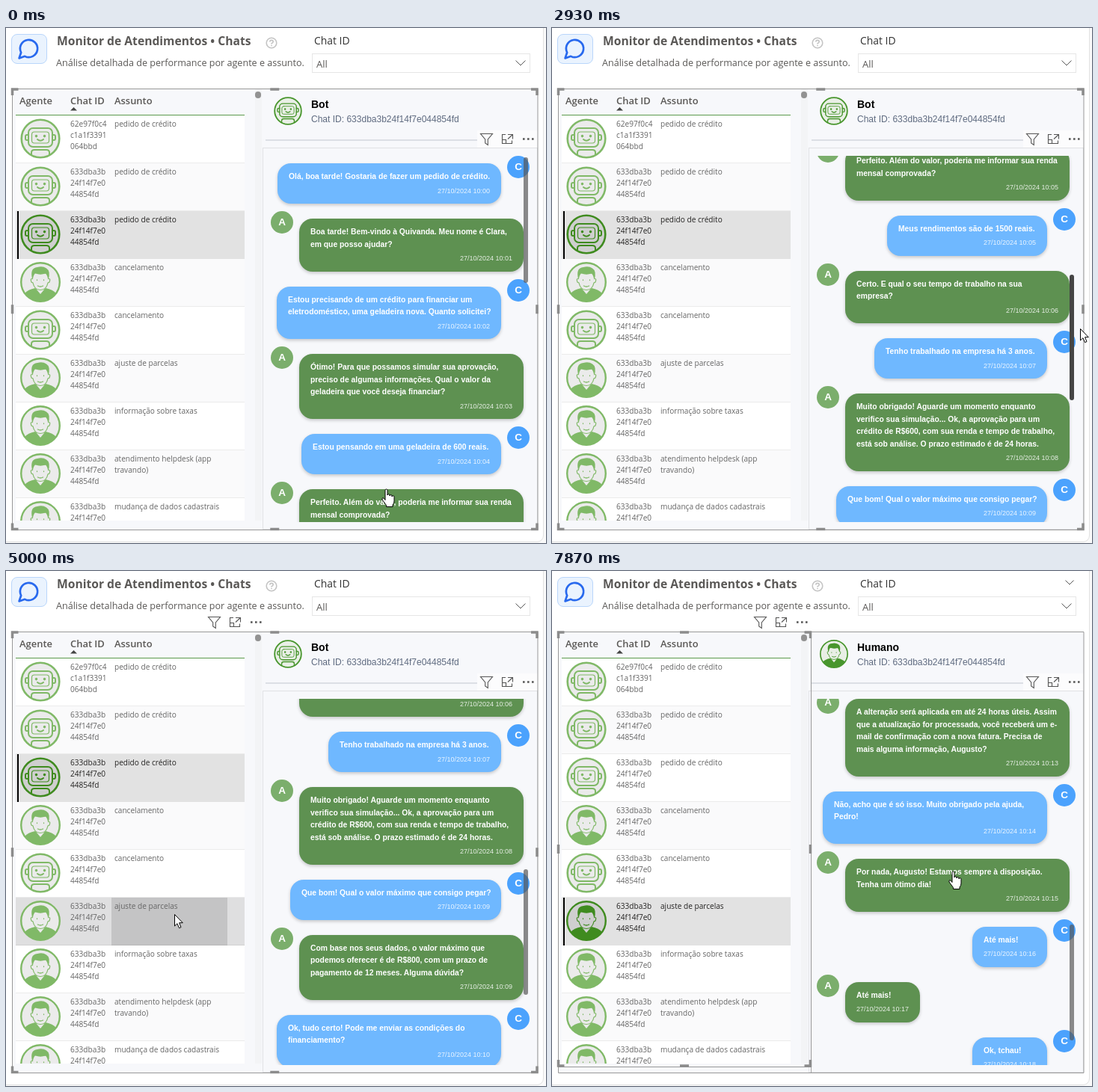
An HTML page that plays this animation: 722x689 px, repeating every 8 s.

```html
<!DOCTYPE html>
<html lang="pt-BR">
<head>
<meta charset="utf-8">
<title>Monitor de Atendimentos</title>
<style>
html, body { margin: 0; width: 100%; height: 100%; overflow: hidden; background: #fafafa; }
body { position: relative; font-family: "Open Sans", "Noto Sans", sans-serif; color: #5a5856; }
div, span, svg, b { position: absolute; box-sizing: border-box; white-space: nowrap; }
svg { overflow: visible; }
.card { left: -10px; top: -10px; width: 729px; height: 698px; background: #fff; border: 1px solid #e1e1e1; border-radius: 9px; }
.logo { left: 7px; top: 8px; width: 48px; height: 40px; background: #eaf3fe; border: 1px solid #b9d6fb; border-radius: 8px; }
.panel { left: 9px; top: 82px; width: 702px; height: 589px; background: #f7f8fb; }
.title { font: 700 15.65px/24px "Open Sans", sans-serif; }
.sub { font-size: 12.57px; line-height: 20px; }
.label { font-size: 13.9px; line-height: 20px; color: #333; }
.select { left: 409px; top: 34px; width: 292px; height: 26px; background: #fff; border: 1px solid #e6e6e6; font-size: 13px; line-height: 26px; padding-left: 5px; }
.head { top: 87px; font: 600 12.95px/20px "Open Sans", sans-serif; }
.gutter { left: 333px; top: 82px; width: 9px; height: 577px; background: #f3f4f6; }
.dot { left: 333px; top: 85px; width: 8px; height: 9px; border-radius: 4px; background: #929292; }
.table { left: 13px; top: 116px; width: 306px; height: 543px; overflow: hidden; border-top: 1px solid #5b9a4b; }
.row { left: 0; width: 306px; height: 64px; box-shadow: inset 0 -1px #ebebeb; background: #fff; color: #666; --bg: #ebebeb; font-size: 10.1px; line-height: 15px; }
.row:nth-child(even) { background: #fafafb; }
.row svg { left: 6px; top: 4px; color: #80b967; }
.row span { top: 4px; white-space: pre; }
.row i { position: absolute; inset: 0; }
.row.hover i { background: rgba(0,0,0,.11); }
.row.hover i::after { content: ""; position: absolute; left: 128px; width: 155px; height: 64px; background: rgba(0,0,0,.12); }
.row.on { background: #e2e2e2; box-shadow: none; color: #252423; --bg: #cfcfcf; }
.row.on::before { content: ""; position: absolute; left: 2px; width: 2px; height: 64px; background: #000; z-index: 1; }
.row.on svg { color: #3f8b1f; }
.agent { left: 358px; top: 92px; color: #48962d; --bg: #e9efe6; }
.name { left: 408px; top: 92px; font: bold 14px/20px Arial, "Liberation Sans", sans-serif; color: #000; }
.chatid { left: 408px; top: 112px; font: 12.03px/20px Arial, "Liberation Sans", sans-serif; color: #5f6b80; }
.rule { left: 347px; top: 149px; width: 363px; height: 2px; background: #dcdfe5; }
.edge { left: 343px; top: 160px; width: 368px; height: 511px; border: 1px solid #e0e1e4; }
.split { left: 346px; top: 82px; width: 1px; height: 589px; background: #a5a5a5; }
.tools { width: 81px; height: 23px; color: #555; }
.view { left: 344px; top: 171px; width: 366px; height: 490px; overflow: hidden; font-family: Arial, "Liberation Sans", sans-serif; }
.list { left: 0; top: 0; width: 366px; }
.msg { position: relative; height: max-content; margin-bottom: 20px; width: 366px; display: flex; }
.msg p { flex: none; margin: 0 0 0 48px; box-sizing: border-box; padding: 10px 15px; border-radius: 18px; color: #fff; font: bold 10.33px/16.5px Arial, "Liberation Sans", sans-serif; box-shadow: 0 2px 4px rgba(0,0,0,.2); background: #5e9151; }
.msg small { display: block; margin-top: 3px; text-align: right; font: 9px/14.5px Arial, "Liberation Sans", sans-serif; color: rgba(255,255,255,.85); }
.msg b { left: 10px; top: -10px; width: 30px; height: 30px; border-radius: 50%; background: #7bae6c; color: #fff; font-size: 13.5px; line-height: 30px; text-align: center; }
.msg.C { justify-content: flex-end; }
.msg.C p { margin: 0 48px 0 0; background: #6fb8ff; }
.msg.C b { left: 326px; background: #4ba2fd; }
.thumb { left: 692px; width: 6px; border-radius: 3px; background: rgba(85,85,85,.68); }
.thumb.dark { background: #454545; }
.off { display: none; }
</style>
</head>
<body>
<svg width="0" height="0" fill="none" stroke="currentColor">
  <symbol id="bot" viewBox="-27 -27 54 54">
    <g fill="none" stroke="currentColor" stroke-width="2" stroke-linecap="round">
      <circle r="25.3" stroke-width="2.6" style="fill:var(--bg)"/>
      <rect x="-16" y="-14" width="32" height="25" rx="6"/>
      <rect x="-11.5" y="-9" width="23" height="15" rx="3.5" stroke-width="1.200"/>
      <path d="M-16-5h-2q-2 0-2 2v3q0 2 2 2h2M16-5h2q2 0 2 2v3q0 2-2 2h-2M-4 1q4 3.500 8 0"/>
      <path d="M-12 21.500v-3q0-3.500 4-3.500h16q4 0 4 3.500v3"/>
      <path d="M-5.500-3.500v.1M5.500-3.500v.1" stroke-width="3.600"/>
    </g>
  </symbol>
  <symbol id="human" viewBox="-27 -27 54 54">
    <circle r="25.8" stroke="currentColor" stroke-width="2.4" style="fill:var(--bg)"/>
    <path d="M-21 15Q-17 10-7 8L0 13 7 8Q17 10 21 15A26 26 0 0 1-21 15Z" fill="currentColor"/>
    <path d="M-5 6V10L0 16 5 10V6Z" style="fill:var(--bg)"/>
    <path d="M-10.500-5Q-14-5-12 0L-10 1Q-8 10.500 0 10.500Q8 10.500 10 1L12 0Q14-5 10.500-5V-12H-10.500Z" style="fill:var(--bg)" stroke="currentColor" stroke-width="1.200"/>
    <path d="M-10.500-3Q-15-19-4-20Q3-22 8-18.500Q14-15 10.500-3Q9.500-9 7-11.500Q-1-9-7-12Q-9.500-9-10.500-3Z" fill="currentColor"/>
    <path d="M-4.500-3v.6M4.500-3v.6M-3.500 5q3.500 2 7 0" fill="none" stroke="currentColor" stroke-width="1.300" stroke-linecap="round"/>
  </symbol>
  <symbol id="tools" viewBox="0 0 81 23">
    <g fill="none" stroke="currentColor" stroke-width="1.1">
      <path d="M4.500 4.500h16l-6.200 7.500v7.500l-3.600-2.500v-5z"/>
      <path d="M38 5.500h-4.500v12h13v-4M41 5.500h6.500v6M47.500 5.500l-6.500 6M33.500 12.500h5v5"/>
    </g>
    <path d="M61 11.500h2.600M67 11.500h2.600M73 11.500h2.600" stroke="currentColor" stroke-width="2.400"/>
  </symbol>
</svg>

<div class="card"></div>
<div class="logo"></div>
<svg style="left:15px;top:12px" width="31" height="31" viewBox="0 0 24 24" fill="none" stroke="#2869ee" stroke-width="2.100" stroke-linejoin="round"><path d="M7.900 20A9 9 0 1 0 4 16.100L2 22Z"/></svg>
<span class="title" style="left:68px;top:5px">Monitor de Atendimentos • Chats</span>
<span class="sub" style="left:67px;top:37px">Análise detalhada de performance por agente e assunto.</span>
<svg style="left:347px;top:12px" width="16" height="16" fill="none" stroke="#c4c4c4" stroke-width="1.600"><circle cx="8" cy="8" r="6.800"/><path d="M5.800 6.600q0-2.200 2.200-2.200t2.200 2q0 1.200-2.200 2.400v.8M8 10.800v1.500"/></svg>
<span class="label" style="left:412px;top:7px">Chat ID</span>
<div class="select">All</div>
<svg style="left:681px;top:43px" width="14" height="8" fill="none" stroke="#555"><path d="M.5 .5 7 7 13.500 .5"/></svg>
<svg id="caret" style="left:686px;top:12px" width="12" height="7" fill="none" stroke="#555"><path d="M.5 .5 6 6 11.500 .5"/></svg>

<div class="panel"></div>
<span class="head" style="left:18px">Agente</span>
<span class="head" style="left:86px">Chat ID</span>
<span class="head" style="left:145px">Assunto</span>
<svg style="left:86px;top:106px" width="9" height="5"><path d="M0 4.500 4.500 0 9 4.500Z" fill="#444"/></svg>
<div class="gutter"></div><div class="dot"></div>
<div class="table" id="table"></div>

<svg class="agent" width="38" height="38"><use id="face" href="#bot"/></svg>
<span class="name" id="name">Bot</span>
<span class="chatid">Chat ID: 633dba3b24f14f7e044854fd</span>
<div class="rule"></div>
<div class="edge" id="edge"></div>
<div class="split" id="split"></div>
<svg class="tools" id="chatTools" style="left:630px;top:137px;background:#fcfcfd"><use href="#tools"/></svg>
<svg class="tools" id="tableTools" style="left:266px;top:57px"><use href="#tools"/></svg>
<div class="view" id="view"></div>
<div class="thumb" id="thumb"></div>

<svg width="722" height="689" style="left:0;top:0" fill="none" stroke="#989898">
  <path d="M8.500 81.500H711V671.500H8.500Z"/>
  <g id="groupFrame"></g>
  <g id="tableFrame"></g>
</svg>
<svg id="cursor" width="1" height="1" style="left:0;top:0" fill="#fff" stroke="#000" stroke-linejoin="round">
  <path id="arrow" d="M.5 .5V16L4 12.700 6.500 18.700 9 17.600 6.600 11.700H11.300Z"/>
  <path id="hand" d="M-2 14.500V1.700Q-2 0-.5 0T1 1.700V8Q1 6.700 2.500 6.700T4 8.200V9Q4.200 7.500 5.600 7.500T7 9V10Q7.300 8.800 8.600 8.800T10 10.300V16Q10 19 8 21V23.500H-.5V21.500L-6 14Q-6.600 12-5 11.700-4 11.600-2 14.500Z"/>
</svg>

<script>
const $ = id => document.getElementById(id);

const subjects = ['pedido de crédito', 'pedido de crédito', 'pedido de crédito', 'cancelamento', 'cancelamento',
  'ajuste de parcelas', 'informação sobre taxas', 'atendimento helpdesk (app\ntravando)', 'mudança de dados cadastrais'];
const agents = 'bbbhbhhhh';
$('table').innerHTML = subjects.map((s, i) => `<div class="row" style="top:${i * 64}px"><i></i>
<svg width="54" height="54"><use href="#${agents[i] === 'b' ? 'bot' : 'human'}"/></svg>
<span style="left:73px">${i ? '633dba3b\n24f14f7e0\n44854fd' : '62e97f0c4\nc1a1f3391\n064bbd'}</span>
<span style="left:132px">${s}</span></div>`).join('');
const rows = [...$('table').children];

// side, minute after 10h, text, bubble width
const botChat = [
  ['C', 0, 'Olá, boa tarde! Gostaria de fazer um pedido de crédito.', 299],
  ['A', 1, 'Boa tarde! Bem-vindo à Quivanda. Meu nome é Clara,|em que posso ajudar?'],
  ['C', 2, 'Estou precisando de um crédito para financiar um|eletrodoméstico, uma geladeira nova. Quanto solicitei?'],
  ['A', 3, 'Ótimo! Para que possamos simular sua aprovação,|preciso de algumas informações. Qual o valor da|geladeira que você deseja financiar?'],
  ['C', 4, 'Estou pensando em uma geladeira de 600 reais.', 267],
  ['A', 5, 'Perfeito. Além do valor, poderia me informar sua renda|mensal comprovada?'],
  ['C', 5, 'Meus rendimentos são de 1500 reais.', 214],
  ['A', 6, 'Certo. E qual o seu tempo de trabalho na sua|empresa?'],
  ['C', 7, 'Tenho trabalhado na empresa há 3 anos.', 231],
  ['A', 8, 'Muito obrigado! Aguarde um momento enquanto|verifico sua simulação... Ok, a aprovação para um|crédito de R$600, com sua renda e tempo de trabalho,|está sob análise. O prazo estimado é de 24 horas.'],
  ['C', 9, 'Que bom! Qual o valor máximo que consigo pegar?', 282],
  ['A', 9, 'Com base nos seus dados, o valor máximo que|podemos oferecer é de R$800, com um prazo de|pagamento de 12 meses. Alguma dúvida?'],
  ['C', 10, 'Ok, tudo certo! Pode me enviar as condições do|financiamento?']
];
const humanChat = [
  ['C', 11, 'Gostaria de ajustar o valor das parcelas do meu|contrato, é possível?'],
  ['A', 12, 'Claro! Posso estender o prazo para reduzir o|valor mensal. A nova parcela seria cobrada a|partir do próximo mês. Deseja confirmar?'],
  ['C', 12, 'Sim, pode confirmar a alteração.', 196],
  ['A', 13, 'A alteração será aplicada em até 24 horas úteis. Assim|que a atualização for processada, você receberá um e-|mail de confirmação com a nova fatura. Precisa de|mais alguma informação, Augusto?'],
  ['C', 14, 'Não, acho que é só isso. Muito obrigado pela ajuda,|Pedro!'],
  ['A', 15, 'Por nada, Augusto! Estamos sempre à disposição.|Tenha um ótimo dia!'],
  ['C', 16, 'Até mais!', 100],
  ['A', 17, 'Até mais!', 100],
  ['C', 18, 'Ok, tchau!', 100]
];
function addChat(messages, top) {
  const list = document.createElement('div');
  list.className = 'list';
  list.style.paddingTop = top + 'px';
  list.innerHTML = messages.map(([side, min, text, width = 300]) => `<div class="msg ${side}"><b>${side}</b>
<p style="width:${width}px">${text.replace(/\|/g, '<br>')}<small>27/10/2024 10:${String(min).padStart(2, '0')}</small></p></div>`).join('');
  $('view').append(list);
  return list;
}
const botList = addChat(botChat, 10), humanList = addChat(humanChat, 677.5);

function handles(x0, y0, x1, y1) {
  const mx = (x0 + x1) / 2, my = (y0 + y1) / 2;
  const corner = (x, y, sx, sy) => `M${x} ${y + 8 * sy}V${y}H${x + 8 * sx}`;
  return `<path stroke="#8c8c8c" stroke-width="3.500" d="${corner(x0, y0, 1, 1)}${corner(x1, y0, -1, 1)}${corner(x0, y1, 1, -1)}${corner(x1, y1, -1, -1)}
M${mx - 6} ${y0}h12M${mx - 6} ${y1}h12M${x0} ${my - 6}v12M${x1} ${my - 6}v12"/>`;
}
$('groupFrame').innerHTML = handles(8.5, 82, 710, 670.5);
$('tableFrame').innerHTML = '<path d="M8.500 81.500H346.500V663.500H8.500Z"/>' + handles(8.5, 82, 345.5, 662);

const scrollKeys = [[1400, 0], [1670, 23], [2000, 116], [2270, 201], [2930, 457], [3130, 520], [3200, 535], [3730, 655],
  [3800, 655], [3870, 657], [7400, 657], [7470, 680], [7870, 949]];
const pathKeys = [[0, 509, 617], [130, 480, 585], [270, 438, 500], [400, 466, 400], [530, 590, 302], [670, 683, 261],
  [800, 683, 261], [1000, 690, 250], [1200, 695, 246], [1670, 696, 253], [2270, 698, 318], [2930, 706, 403],
  [4200, 706, 470], [4400, 610, 464], [4600, 450, 457], [4800, 290, 456], [5000, 225, 459], [6800, 225, 459],
  [6930, 275, 452], [7130, 440, 418], [7330, 537, 402]];

function track(keys, t, col = 1) {
  const i = keys.findIndex(k => k[0] > t);
  if (i === 0) return keys[0][col];
  if (i < 0) return keys[keys.length - 1][col];
  const a = keys[i - 1], b = keys[i];
  return a[col] + (b[col] - a[col]) * (t - a[0]) / (b[0] - a[0]);
}
const show = (id, on) => { $(id).style.display = on ? 'block' : 'none'; };

function draw(t) {
  const scroll = Math.round(track(scrollKeys, t));
  const human = t >= 7470, clicked = t >= 6330;
  const dragging = t >= 1470 && t < 4200;
  const ratio = human ? .316 : .344;
  const thumbTop = Math.round(173 + scroll * ratio);
  const x = Math.round(track(pathKeys, t));
  const y = dragging ? thumbTop + 72 : Math.round(track(pathKeys, t, 2));
  const overTable = x < 343;

  botList.classList.toggle('off', human);
  humanList.classList.toggle('off', !human);
  (human ? humanList : botList).style.transform = `translateY(${-scroll}px)`;
  $('face').setAttribute('href', human ? '#human' : '#bot');
  $('name').textContent = human ? 'Humano' : 'Bot';

  $('thumb').style.top = thumbTop + 'px';
  $('thumb').style.height = (human ? 155 : 168) + 'px';
  $('thumb').classList.toggle('dark', t >= 1000 && t <= 4200);

  rows.forEach((row, i) => {
    row.classList.toggle('on', i === (clicked ? 5 : 2));
    row.classList.toggle('hover', x > 13 && x < 319 && Math.floor((y - 117) / 64) === i);
  });
  show('caret', clicked);
  show('split', clicked);
  show('tableFrame', clicked);
  show('groupFrame', !clicked);
  show('tableTools', clicked || overTable);
  show('chatTools', !clicked || !overTable);
  show('edge', !clicked || !overTable);

  const hand = !overTable && x < 690;
  show('hand', hand);
  show('arrow', !hand);
  $('cursor').style.transform = `translate(${x}px,${y}px)`;
}

const STEP = 200 / 3;
let start;
function tick(now) {
  start ??= now;
  const step = Math.floor((now - start + 4) / STEP) % 120;
  draw(Math.round(step * STEP / 10) * 10);
  requestAnimationFrame(tick);
}
draw(0);
requestAnimationFrame(tick);
</script>
</body>
</html>
```
